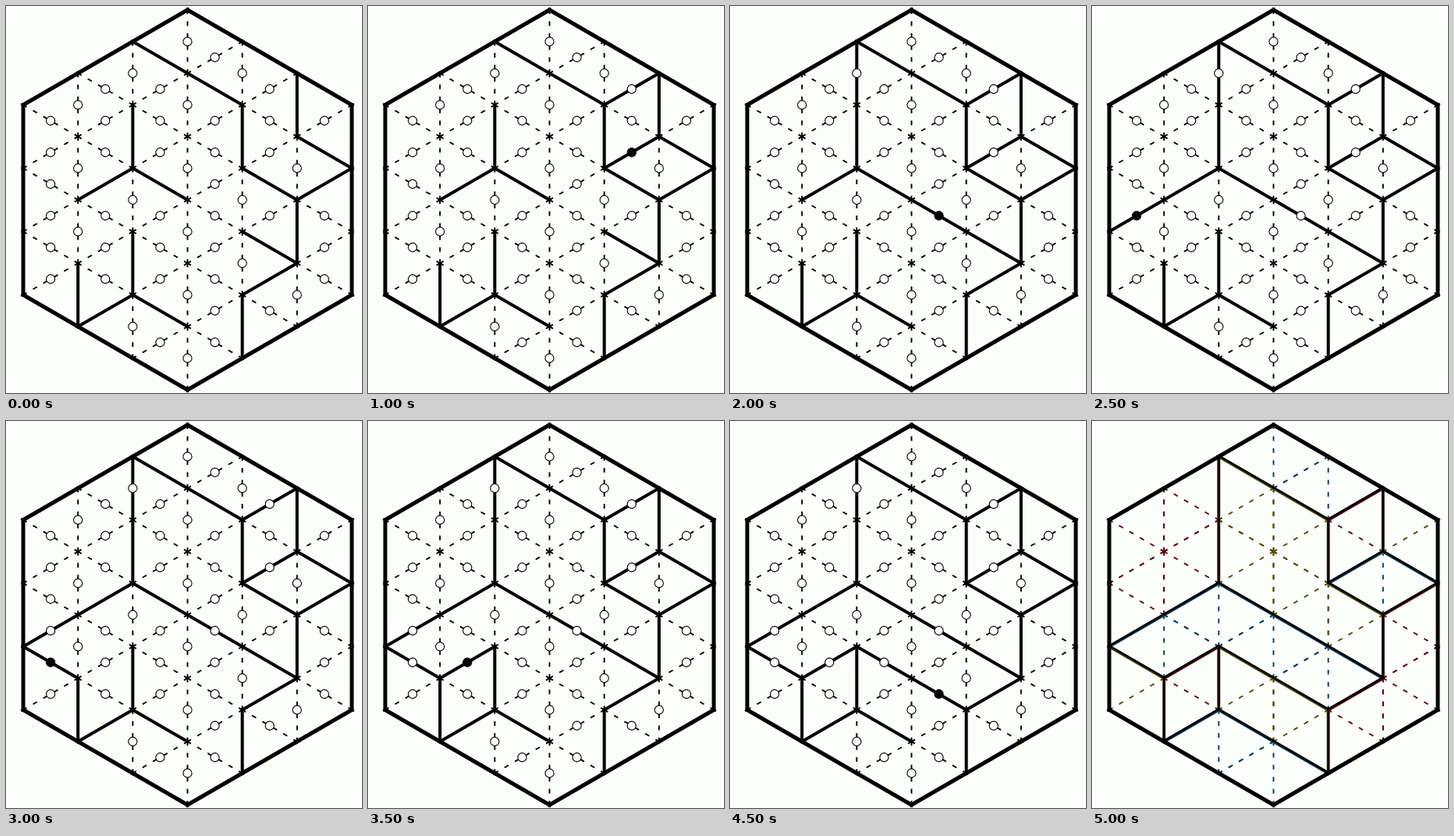
Recreate the animation shown at these times as an HTML page with a canvas. Size 456x495 px, loop 5.5 s.

```html
<!DOCTYPE html>
<html lang="en">
<head>
<meta charset="utf-8">
<title>Lozenge puzzle</title>
<style>
html, body { margin: 0; width: 100%; height: 100%; overflow: hidden; background: #fbfefa; }
canvas { display: block; }
</style>
</head>
<body>
<canvas id="stage" width="456" height="495"></canvas>
<script>
const ctx = document.getElementById('stage').getContext('2d');
const SIZE = 3, SIDE = 81, STEP = 500, LOOP = 5500;
const PAPER = '#fbfefa', INK = '#000', RED = '#5c0a14', BLUE = '#0a3a58', OLIVE = '#504a08';

// The tiling is a stack of cubes in a corner: one row of column heights per b
const heights = ['332', '111', '100'];
// Midpoints of the walls added one by one; the last appears with the solution
const moves = ('1.5,-3.5 1.5,-1.5 -1,-4 0.5,0.5 -2.5,0.5 -2.5,1.5 ' +
  '-1.5,1.5 -0.5,1.5 0.5,2.5 0.5,4.5').split(' ');

function height(a, b) {
  if (a < 0 || b < 0) return SIZE;
  return a < SIZE && b < SIZE ? +heights[b][a] : 0;
}

const A = [1, 1], B = [-1, 1], UP = [0, -2];
const add = (p, q) => [p[0] + q[0], p[1] + q[1]];
const project = (a, b, h) => [a - b, a + b - 2 * h];
const toPixel = ([i, j]) => [232.5 + SIDE * Math.sqrt(3) / 2 * i, 248 + SIDE / 2 * j];

const faces = [], edges = new Map();

function addEdge(p, q, color) {
  const mid = [(p[0] + q[0]) / 2, (p[1] + q[1]) / 2];
  const key = String(mid);
  if (!edges.has(key)) edges.set(key, { key, mid, ends: [p, q], colors: [] });
  const edge = edges.get(key);
  edge.colors.push(color);
  return edge;
}

function addFace(color, p, u, v) {
  const shape = [p, add(p, u), add(add(p, u), v), add(p, v)];
  const sides = shape.map((c, n) => addEdge(c, shape[(n + 1) % 4], color));
  // the short diagonal belongs to this face on both sides
  const diagonal = addEdge(p, shape[2], color);
  diagonal.colors.push(color);
  faces.push({ color, shape, edges: [...sides, diagonal] });
}

for (let a = 0; a <= SIZE; a++) {
  for (let b = 0; b <= SIZE; b++) {
    const h = height(a, b);
    if (a < SIZE && b < SIZE) addFace(BLUE, project(a, b, h), A, B);
    for (let z = h; a < SIZE && z < height(a, b - 1); z++) addFace(OLIVE, project(a, b, z), A, UP);
    for (let z = h; b < SIZE && z < height(a - 1, b); z++) addFace(RED, project(a, b, z), B, UP);
  }
}

const all = [...edges.values()];
const rim = all.filter(e => e.colors.length === 1);
const walls = all.filter(e => e.colors.length === 2 && e.colors[0] !== e.colors[1]);
const dotted = all.filter(e => e.colors.length === 2 && e.colors[0] === e.colors[1]);

function trace(points) {
  ctx.beginPath();
  points.forEach(p => ctx.lineTo(...toPixel(p)));
}

function strokeAll(list, width, color = INK) {
  ctx.lineWidth = width;
  ctx.strokeStyle = color;
  for (const e of list) {
    trace(e.ends);
    ctx.stroke();
  }
}

function dashAll(list, color) {
  const dash = 4.2;
  ctx.setLineDash([dash, (SIDE - dash) / 5 - dash]);
  strokeAll(list, 1.9, color);
  ctx.setLineDash([]);
}

function knob({ mid }, fill) {
  ctx.beginPath();
  ctx.arc(...toPixel(mid), 5.6, 0, 2 * Math.PI);
  ctx.fillStyle = fill;
  ctx.fill();
  ctx.lineWidth = 1.1;
  ctx.strokeStyle = INK;
  ctx.stroke();
}

function drawPuzzle(count) {
  const isOpen = e => moves.indexOf(e.key) >= count;
  dashAll([...dotted, ...walls.filter(isOpen)], INK);
  strokeAll(walls.filter(e => !isOpen(e)), 4);
  [...dotted, ...walls.filter(e => moves.includes(e.key))]
    .forEach(e => knob(e, e.key === moves[count - 1] ? INK : '#fff'));
}

function drawSolved() {
  for (const { color, shape, edges } of faces) {
    dashAll(edges.filter(e => dotted.includes(e)), color);
  }
  for (const { color, shape, edges } of faces) {
    ctx.save();
    trace(shape);
    ctx.clip();
    strokeAll(edges.filter(e => walls.includes(e)), 4, color);
    ctx.restore();
  }
  // raised black core leaves each face's colour showing below its upper edges
  ctx.save();
  ctx.translate(0, -0.9);
  strokeAll(walls, 2.6);
  ctx.restore();
}

function frame(now) {
  const step = Math.floor(now % LOOP / STEP);
  ctx.fillStyle = PAPER;
  ctx.fillRect(0, 0, 456, 495);
  ctx.lineCap = 'square';
  if (step < moves.length) drawPuzzle(step);
  else drawSolved();
  strokeAll(rim, 5);
  requestAnimationFrame(frame);
}
frame(performance.now());
</script>
</body>
</html>
```
